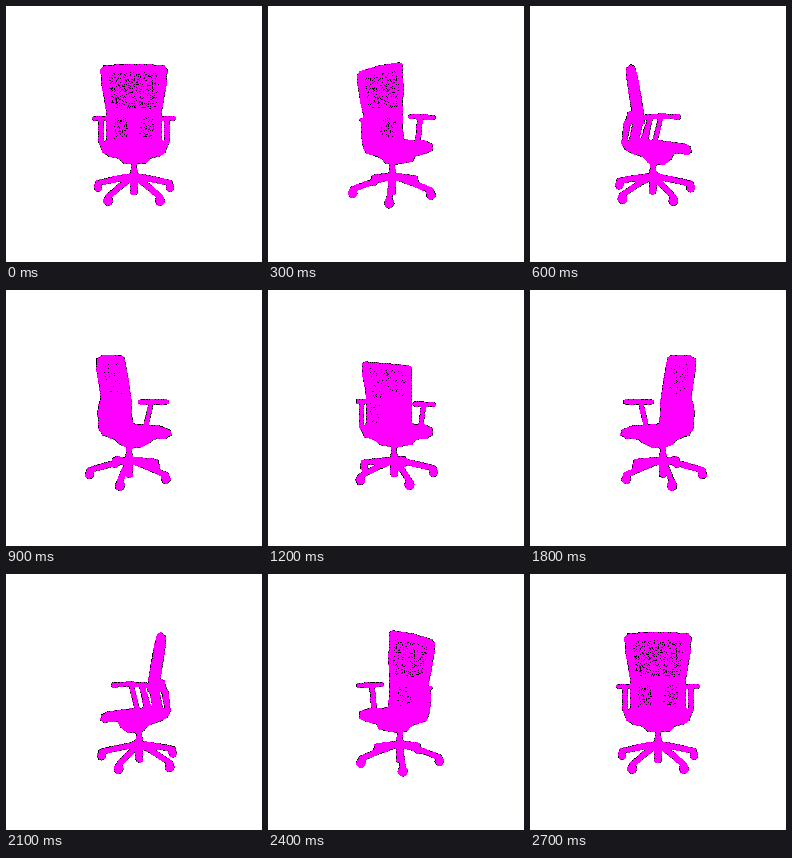
An HTML page with a canvas that plays this animation: 256x256 px, repeating every 3 s.

```html
<!DOCTYPE html>
<html lang="en">
<head>
<meta charset="utf-8">
<title>Turning office chair</title>
<style>
html, body { margin: 0; width: 100%; height: 100%; overflow: hidden; background: #fff; }
canvas { display: block; width: 100vw; height: 100vh; image-rendering: pixelated; }
</style>
</head>
<body>
<canvas id="stage" width="256" height="256"></canvas>
<script>
const SIZE = 256, AXIS = 128, STEP = 300, LOOP = 3000;
const ctx = document.getElementById('stage').getContext('2d');
const layer = document.createElement('canvas');
layer.width = layer.height = SIZE;
const pen = layer.getContext('2d', { willReadFrequently: true });

// solid: filled outlines, bars: round strokes as [path, width],
// mesh: speckled areas, gaps: openings, grain: speckle density
const poses = {
  front: {
    turn: 0, grain: 0.2,
    solid: ['M95 64L98 60L112 59H144L158 60L161 64L160 78L157 95L155 108V134L160 137L159 146L153 150L145 152L139 157H118L112 152L103 150L97 146L96 137L101 134V108L99 95L96 78Z'],
    bars: [['M89 112.5H98', 5.5], ['M167 112.5H158', 5.5],
           ['M95 114V136L98 143', 5.5], ['M161 114V136L158 143', 5.5]],
    mesh: ['M104 66H152L153 76L150 101L140 104L128 102L116 104L106 101L103 76Z',
           'M108 112L120 110L123 130L108 133Z', 'M148 112L136 110L133 130L148 133Z'],
    gaps: []
  },
  frontSide: {
    turn: 320, grain: 0.16,
    solid: ['M122 58L125 57L145 60L164 66L166 69L166 78L163 96L160 110L161 128L161 139L158 147L150 149L141 153L139 157L127 158L111 155L109 150L98 147L92 144V138L100 135L121 134L122 106L121 85Z'],
    bars: [['M91 111.5L113 110.5', 5.5], ['M104 113L106 134', 6], ['M161 114H163', 4], ['M162 116V132', 2]],
    mesh: ['M127 65L146 68L159 73L158 86L155 101L137 104L126 100L125 82Z',
           'M128 113L140 112L145 129L130 132Z'],
    gaps: []
  },
  side: {
    turn: 280, grain: 0,
    solid: ['M152 60L155 59L159 62L159 72L157 86L154 105L158 107L159 112L162 118L164 137L161 143L154 147L142 151L138 156L132 159L122 158L115 153L112 147L98 148L95 146L96 141L102 138L125 135L140 134L143 105L145 92L149 70Z'],
    bars: [['M107.5 111L124 110L140 111', 5.5], ['M126 114L131 135', 5.5], ['M136 112L141 135', 6]],
    mesh: [],
    gaps: ['M131 117L133 117L136 132L134 132Z', 'M141 118L143 118L146 131L145 132Z', 'M154 118L155 118L158 133L157 134Z']
  },
  rearSide: {
    turn: 240, grain: 0.04,
    solid: ['M138 68L141 66L160 66L165 69L165 80L162 98L161 108L164 122L163 138L159 145L148 149L142 154L133 158L122 157L112 152L109 149L96 148L91 145L92 140L103 136L130 134L131 111L134 90Z'],
    bars: [['M95 112L122 112', 5], ['M111 114L116 135', 5.5], ['M135 114L161 114', 5], ['M149 115L152 137', 5]],
    mesh: ['M142 73L159 73L157 90L154 104L139 104Z'],
    gaps: []
  },
  rear: {
    turn: 200, grain: 0.07,
    solid: ['M113 78L115 76L136 74L159 72L161 74L161 85L158 101L157 114V132L160 138L159 146L149 150L143 155L128 157L112 154L108 149L97 148L92 145V138L100 135L113 134V108Z'],
    bars: [['M91 114.5L109 114', 5.5], ['M100.5 116L103 135', 5.5], ['M158 112L166 111.5', 5],
           ['M162 113L162.5 137L158 146', 5]],
    mesh: ['M117 81L156 78L153 101L150 108L118 106Z', 'M144 113L154 112L153 131L146 134Z'],
    gaps: []
  }
};

const half = ['front', 'frontSide', 'side', 'rearSide', 'rear'];
const order = [...half, ...half.slice().reverse()];

const rad = deg => deg * Math.PI / 180;

function noise(x, y) {
  const n = Math.sin(x * 12.9898 + y * 78.233) * 43758.5453;
  return n - Math.floor(n);
}

function fill(path, color) {
  pen.fillStyle = color;
  pen.fill(new Path2D(path));
}

function bar(path, width) {
  pen.strokeStyle = '#f00';
  pen.lineWidth = width;
  pen.stroke(new Path2D(path));
}

// Five-legged base, turned about a slightly off-centre column
function drawBase(turn) {
  const cx = AXIS + 5.5 * Math.sin(rad(360 - turn));
  const cy = 183.5 + Math.cos(rad(turn));
  bar(`M${cx} 154V171`, 6);
  bar(`M${cx} 166V${cy + 1}`, 8);
  const shift = (360 - turn) % 72;
  for (let i = 0; i < 5; i++) {
    const a = rad(36 + 72 * i - shift);
    const near = Math.cos(a);
    const x = cx - Math.sin(a) * 39.5 * (1 + 0.14 * near);
    const y = cy + 11.5 * near + 1.5 * near * near;
    const midX = cx + (x - cx) * 0.55;
    bar(`M${cx} 170Q${midX} ${170 + (y - 175) * 0.5} ${x} ${y - 4}`, 6.4);
    pen.fillStyle = '#f00';
    pen.beginPath();
    pen.ellipse(x, y, 4.6 + 0.6 * near, 5 + 0.5 * near, 0, 0, 2 * Math.PI);
    pen.fill();
  }
}

function drawShapes(pose, flip) {
  pen.setTransform(1, 0, 0, 1, 0, 0);
  pen.clearRect(0, 0, SIZE, SIZE);
  if (flip) pen.setTransform(-1, 0, 0, 1, SIZE, 0);
  pen.lineCap = pen.lineJoin = 'round';
  drawBase(pose.turn);
  for (const path of pose.solid) {
    fill(path, '#f00');
    bar(path, 1.6);
  }
  for (const [path, width] of pose.bars) bar(path, width);
  for (const path of pose.mesh) fill(path, '#00f');
  pen.globalCompositeOperation = 'destination-out';
  for (const path of pose.gaps) fill(path, '#000');
  pen.globalCompositeOperation = 'source-over';
}

// Hard pixels: magenta body, broken black rim, speckled mesh
function render(index) {
  const pose = poses[order[index]];
  drawShapes(pose, index > 0 && index < 5);
  const src = pen.getImageData(0, 0, SIZE, SIZE).data;
  const out = ctx.createImageData(SIZE, SIZE);
  const inside = (x, y) => src[(y * SIZE + x) * 4 + 3] > 127;
  for (let y = 0; y < SIZE; y++) {
    for (let x = 0; x < SIZE; x++) {
      const p = (y * SIZE + x) * 4;
      let color = [255, 255, 255];
      if (inside(x, y)) {
        const rim = !inside(x - 1, y) || !inside(x + 1, y) || !inside(x, y - 1) || !inside(x, y + 1);
        const mesh = src[p + 2] > 127;
        const dark = rim ? 0.4 : mesh ? pose.grain : 0;
        color = noise(x, y) < dark ? [0, 0, 0] : [255, 0, 255];
      }
      out.data.set([...color, 255], p);
    }
  }
  return out;
}

const views = order.map((_, i) => render(i));
let shown = -1;

function update(time) {
  const index = Math.floor((time % LOOP) / STEP);
  if (index !== shown) ctx.putImageData(views[index], 0, 0);
  shown = index;
}

function tick() {
  update(performance.now());
  requestAnimationFrame(tick);
}
tick();
</script>
</body>
</html>
```
